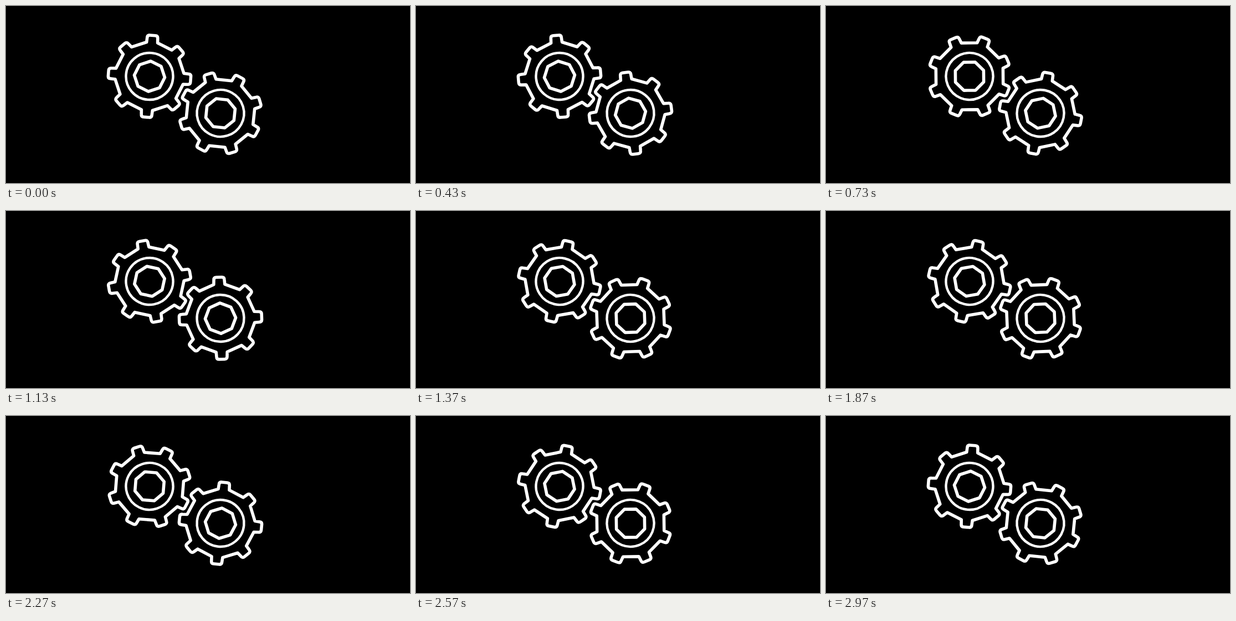
An HTML page that plays this animation: 729 px wide and 321 px high, repeating every 3 s.

```html
<!DOCTYPE html>
<html lang="en">
<head>
<meta charset="utf-8">
<title>Gears</title>
<style>
  html, body { margin: 0; width: 100%; height: 100%; overflow: hidden; background: #000; }
  svg { display: block; width: 729px; height: 321px; }
  #gear { fill: none; stroke: #fff; stroke-width: 5.6; stroke-linejoin: round; }
</style>
</head>
<body>
<svg viewBox="0 0 729 321">
  <defs>
    <g id="gear">
      <path id="rim"/>
      <circle r="42.5" stroke-width="4.4"/>
      <path id="hub"/>
    </g>
  </defs>
  <use id="left" href="#gear"/>
  <use id="right" href="#gear"/>
</svg>
<script>
const LOOP = 3000, TICKS = 90, POSES = 37, TEETH = 8;
const $ = id => document.getElementById(id);

// Point at (x, y) of an upright tooth, turned to tooth i
function at(i, x, y) {
  const a = i * 2 * Math.PI / TEETH, c = Math.cos(a), s = Math.sin(a);
  return `${(x * c + y * s).toFixed(2)} ${(x * s - y * c).toFixed(2)}`;
}

let rim = '', hub = '';
for (let i = 0; i < TEETH; i++) {
  const p = (x, y) => at(i, x, y);
  rim += `${i ? 'L' : 'M'}${p(-10, 61.4)}L${p(-9.5, 69.8)}Q${p(-9.5, 74.4)} ${p(-5, 74.4)}`
       + `L${p(5, 74.4)}Q${p(9.5, 74.4)} ${p(9.5, 69.8)}L${p(10, 61.4)}`;
  hub += `${i ? 'L' : 'M'}${p(0, 27.6)}`;
}
$('rim').setAttribute('d', rim + 'Z');
$('hub').setAttribute('d', hub + 'Z');

function place(id, x, y, angle) {
  $(id).setAttribute('transform', `translate(${x} ${y}) rotate(${angle})`);
}

function draw() {
  // 12.5 poses per second, shown on a 30 fps grid
  const tick = Math.floor((performance.now() % LOOP) * TICKS / LOOP + 0.15);
  const pose = Math.max(0, Math.ceil(tick * 5 / 12) - 1);
  const u = (pose + 0.45) / POSES;
  const turn = 90 * (1 - Math.cos(Math.PI * u)); // half a turn, sine ease in and out
  place('left', 259, 127.5, 4.4 - turn);
  place('right', 387, 194.5, 28.3 + turn);
  requestAnimationFrame(draw);
}
draw();
</script>
</body>
</html>
```
